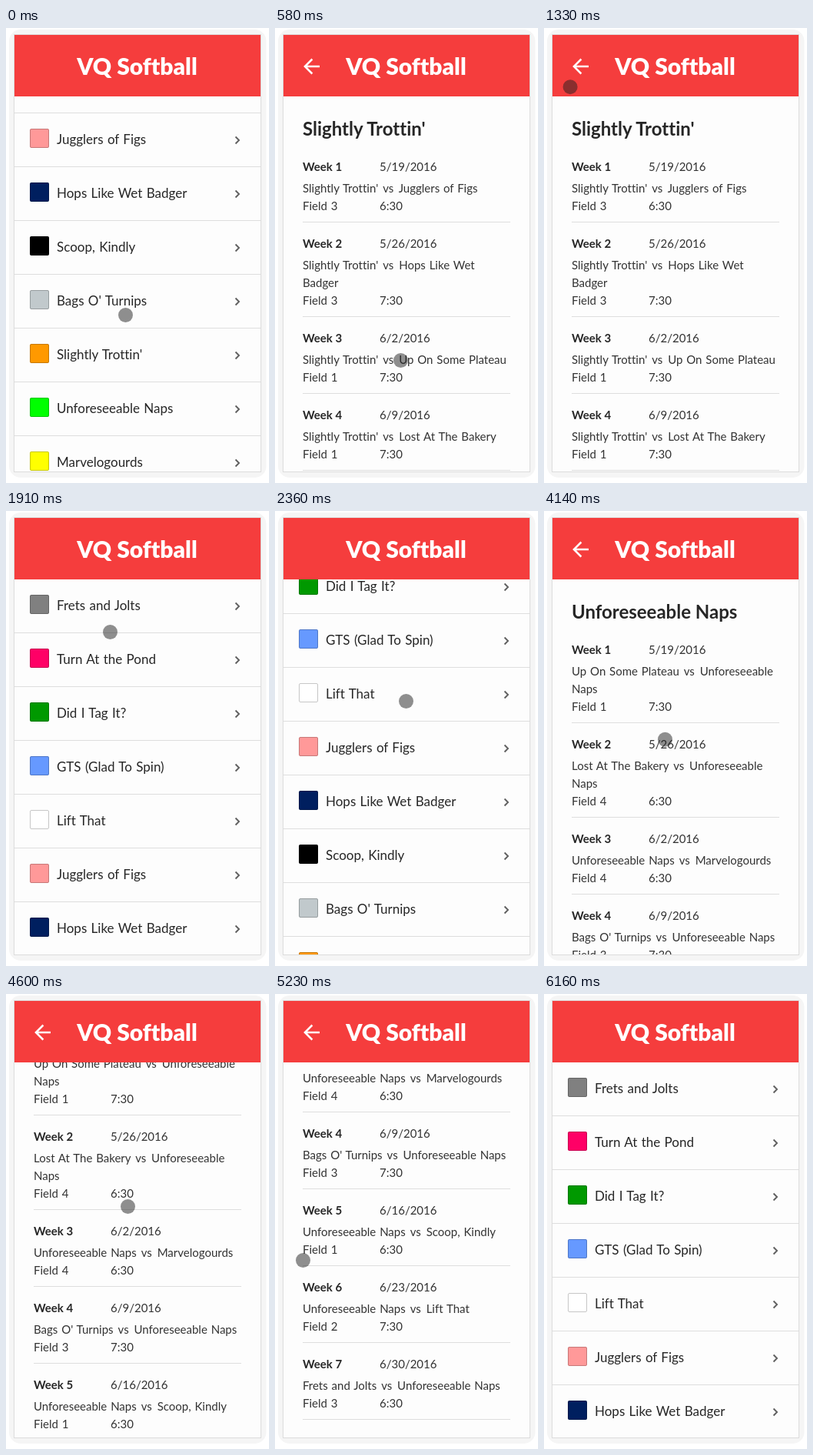
Animation, 342 px wide and 592 px high, one loop 7280 ms. Source, as an HTML page:

```html
<!DOCTYPE html>
<html lang="en">
<head>
<meta charset="utf-8">
<title>VQ Softball</title>
<style>
  html, body { margin: 0; width: 100%; height: 100%; overflow: hidden; background: #fff; }
  svg { display: block; width: 342px; height: 592px; }
  text { font-family: Lato, "Open Sans", sans-serif; font-variant-ligatures: none; fill: #262626; white-space: pre; }
  .title { font-size: 30px; font-weight: 900; fill: #fff; text-anchor: middle; }
  .team { font-size: 17px; word-spacing: 1px; }
  .heading { font-size: 24px; font-weight: 700; }
  .line { font-size: 15px; word-spacing: 1px; fill: #333; }
  .week { font-size: 15px; font-weight: 700; }
  .rule { stroke: #dedede; }
  .chevron { fill: none; stroke: #606060; stroke-width: 1.9; }
  .edge { fill: none; stroke: #000; stroke-opacity: .22; }
</style>
</head>
<body>
<svg viewBox="0 0 342 592">
  <defs><clipPath id="view"><rect x="11" y="89" width="320" height="488"/></clipPath></defs>
  <rect x="4" y="2" width="334.5" height="583" rx="15" fill="#f5f5f5"/>
  <rect x="10.5" y="8.5" width="321" height="569" fill="#fdfdfd" stroke="#dcdcdc"/>
  <g clip-path="url(#view)">
    <g id="list"></g>
    <g id="first"></g>
    <g id="second"></g>
  </g>
  <rect x="11" y="9" width="320" height="80" fill="#f53d3d"/>
  <text class="title" x="170.5" y="61">VQ Softball</text>
  <path id="back" d="M58 50H39M48.4 40.5L38.9 50L48.4 59.5" fill="none" stroke="#fff" stroke-width="2.5"/>
  <circle id="cursor" r="9.5" fill="#202020" fill-opacity=".5"/>
</svg>
<script>
const LOOP = 7280, STEP = 57.25;
const $ = id => document.getElementById(id);

const teams = {
  "Frets and Jolts": "#808080",
  "Turn At the Pond": "#ff0066",
  "Did I Tag It?": "#009900",
  "GTS (Glad To Spin)": "#6699ff",
  "Lift That": "#ffffff",
  "Jugglers of Figs": "#ff9999",
  "Hops Like Wet Badger": "#001f5f",
  "Scoop, Kindly": "#000000",
  "Bags O' Turnips": "#c1c9cc",
  "Slightly Trottin'": "#ff9900",
  "Unforeseeable Naps": "#00ff00",
  "Marvelogourds": "#ffff00"
};
const trot = "Slightly Trottin'", naps = "Unforeseeable Naps";

// Each game: home, away, field, hour
const trotGames = [
  [trot, "Jugglers of Figs", 3, 6],
  [trot, "Hops Like Wet Badger", 3, 7],
  [trot, "Up On Some Plateau", 1, 7],
  [trot, "Lost At The Bakery", 1, 7]
];
const napGames = [
  ["Up On Some Plateau", naps, 1, 7],
  ["Lost At The Bakery", naps, 4, 6],
  [naps, "Marvelogourds", 4, 6],
  ["Bags O' Turnips", naps, 3, 7],
  [naps, "Scoop, Kindly", 1, 6],
  [naps, "Lift That", 2, 7],
  ["Frets and Jolts", naps, 3, 6]
];

const text = (cls, x, y, s) => `<text class="${cls}" x="${x}" y="${y}">${s}</text>`;
const rule = (x1, x2, y) => `<path class="rule" d="M${x1} ${y}H${x2}"/>`;
const swatch = (x, y, color) =>
  `<rect x="${x}" y="${y}" width="25" height="25" rx="2" fill="${color}"/>` +
  `<rect class="edge" x="${x + .5}" y="${y + .5}" width="24" height="24" rx="1.5"/>`;

function listMarkup() {
  return Object.entries(teams).map(([name, color], i) => {
    const y = 89 + 70 * i;
    return swatch(31, y + 20, color)
      + text("team", 66, y + 40, name)
      + `<path class="chevron" d="M298.5 ${y + 30.5}l4.5 4.5l-4.5 4.5"/>`
      + rule(11, 331, y + 69.5);
  }).join("");
}

function weekDate(i) {
  const day = new Date(2016, 4, 19 + 7 * i);
  return `${day.getMonth() + 1}/${day.getDate()}/2016`;
}

function scheduleMarkup(team, games) {
  let y = 186, out = text("heading", 36, 140, team);
  games.forEach(([home, away, field, hour], i) => {
    // Long pairings push the last word onto a second line
    const cut = (home + away).length >= 36 ? away.lastIndexOf(" ") : away.length;
    out += text("week", 36, y, "Week " + (i + 1)) + text("line", 136, y, weekDate(i));
    out += text("line", 36, y + 28,
      `${home} <tspan dx="1.5">vs</tspan> <tspan dx="2">${away.slice(0, cut)}</tspan>`);
    if (cut < away.length) {
      y += 23;
      out += text("line", 36, y + 28, away.slice(cut + 1));
    }
    out += text("line", 36, y + 51, "Field " + field) + text("line", 136, y + 51, hour + ":30");
    out += rule(36, 306, y + 66.5);
    y += 100;
  });
  return out;
}

// Pointer trips: first step, last step, destination
const trips = [
  [0, 5, 159, 434],     // choose a team
  [9, 10, 163, 432],
  [12, 24, 31, 69],     // go to the back arrow
  [24, 27, 48, 57],
  [29, 33, 135, 157],   // return to the list
  [33, 38, 170, 247],
  [45, 60, 148, 476],   // choose another team
  [64, 74, 158, 276],
  [86, 91, 36, 346],    // swipe back from the left edge
  [91, 97, 258, 372],
  [99, 106, 327, 388]
];

// Eased progress from 0 to 1 between steps a and b
function ease(k, a, b) {
  const u = Math.min(1, Math.max(0, (k - a) / (b - a)));
  return u * u * (3 - 2 * u);
}

function pointer(k) {
  let x = 155, y = 373;
  for (const [a, b, toX, toY] of trips) {
    const u = ease(k, a, b);
    x += (toX - x) * u;
    y += (toY - y) * u;
  }
  return [x + .5, y + .5];
}

const show = (id, on) => $(id).setAttribute("visibility", on ? "visible" : "hidden");
const move = (id, x, y) => $(id).setAttribute("transform", `translate(${x} ${y})`);

function draw(t) {
  const k = Math.min(126, Math.floor(t / STEP));
  const first = t >= 580 && t < 1730, second = t >= 3670 && t < 5750;
  const listScroll = t < 580 ? 328 : t < 3670 ? 352 * ease(k, 40, 42.09) : 0;
  show("first", first);
  show("second", second);
  show("back", first || second);
  show("list", !first && !second);
  move("list", 0, -Math.round(listScroll));
  move("second", 0, -Math.round(345 * ease(k, 76, 86.2)));
  move("cursor", ...pointer(k));
  show("cursor", k < 107);
}

$("list").innerHTML = listMarkup();
$("first").innerHTML = scheduleMarkup(trot, trotGames);
$("second").innerHTML = scheduleMarkup(naps, napGames);

const start = performance.now();
function tick() {
  draw((performance.now() - start) % LOOP);
  requestAnimationFrame(tick);
}
tick();
</script>
</body>
</html>
```
